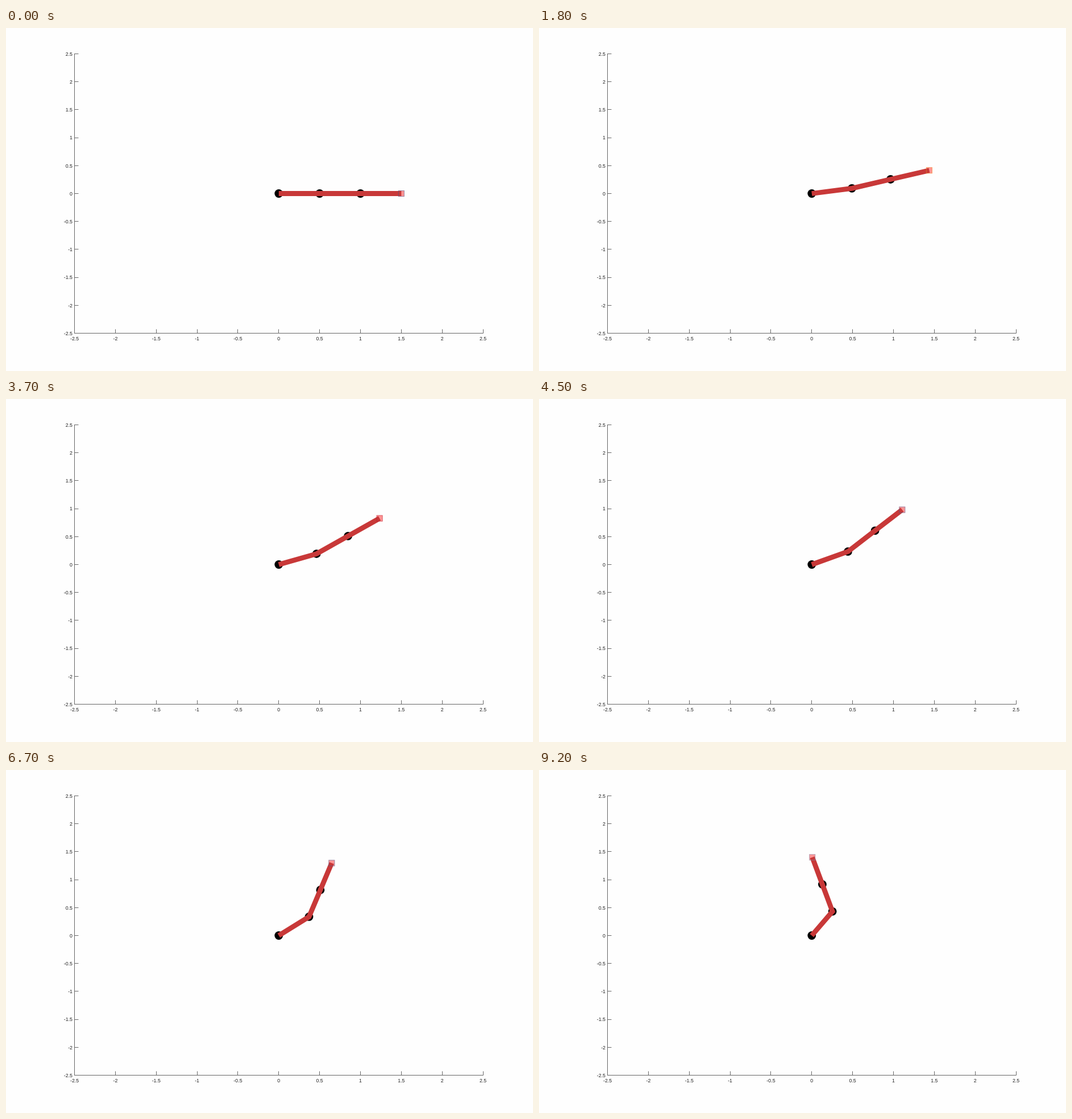
Animation, 927 px wide and 604 px high, one loop 9300 ms. Source, as an HTML page with a canvas:

```html
<!DOCTYPE html>
<html>
<head>
<meta charset="utf-8">
<style>
html, body { margin: 0; width: 100%; height: 100%; overflow: hidden; background: #fefefe; }
canvas { display: block; }
</style>
</head>
<body>
<canvas id="stage" width="927" height="604"></canvas>
<script>
const ctx = document.getElementById('stage').getContext('2d');
const LOOP = 9300, STEP = 100, HOLD = 6;
const EDGES = ['#0072bd', '#d95319', '#edb120', '#7e2f8e', '#77ac30', '#4dbeee', '#a2142f'];

const px = x => 479.8 + 143.7 * x;
const py = y => 291.5 - 98.4 * y;

function line(x1, y1, x2, y2) {
  ctx.beginPath();
  ctx.moveTo(x1, y1);
  ctx.lineTo(x2, y2);
  ctx.stroke();
}

function drawAxes() {
  ctx.strokeStyle = '#666';
  ctx.lineWidth = 1;
  ctx.fillStyle = '#222';
  ctx.font = '8.8px "Liberation Sans", Helvetica, Arial, sans-serif';
  line(120.5, 45, 120.5, 538);
  line(120, 537.5, 839.5, 537.5);
  for (let i = -5; i <= 5; i++) {
    const v = i / 2;
    const x = Math.floor(px(v)) + 0.5, y = Math.floor(py(v)) + 0.5;
    line(x, 530.5, x, 537.5);
    line(120.5, y, 127.5, y);
    ctx.textAlign = 'center';
    ctx.fillText(v, px(v), 549.8);
    ctx.textAlign = 'right';
    ctx.fillText(v, 117, py(v) + 3.2);
  }
}

// Swing progress in degrees of the arm's tip, slightly accelerating
function swing(n) {
  return n < HOLD ? 0 : 0.875 * n + 0.00105 * n * n;
}

function drawArm(phase) {
  const rad = Math.PI / 180;
  const a = phase * 2 / 3 * rad, c = phase * 7 / 6 * rad;
  const joints = [[0, 0]];
  for (const angle of [a, c, c]) {
    const [x, y] = joints[joints.length - 1];
    joints.push([x + 0.5 * Math.cos(angle), y + 0.5 * Math.sin(angle)]);
  }
  const pts = joints.map(([x, y]) => [px(x), py(y)]);
  const [tx, ty] = pts[3];

  ctx.fillStyle = '#ff9494';
  ctx.fillRect(tx - 5.5, ty - 5.5, 11, 11);

  ctx.fillStyle = '#000';
  for (const [x, y] of pts.slice(0, 3)) {
    ctx.beginPath();
    ctx.arc(x, y, 7.4, 0, 2 * Math.PI);
    ctx.fill();
  }

  ctx.strokeStyle = '#c83838';
  ctx.lineWidth = 8.8;
  ctx.lineJoin = 'miter';
  ctx.beginPath();
  pts.forEach(([x, y]) => ctx.lineTo(x, y));
  ctx.stroke();

  ctx.globalAlpha = 0.4;
  ctx.strokeStyle = EDGES[Math.round(phase) % EDGES.length];
  ctx.lineWidth = 1;
  ctx.strokeRect(tx - 5, ty - 5, 10, 10);
  ctx.globalAlpha = 1;
}

const start = performance.now();
function frame() {
  const t = (performance.now() - start) % LOOP;
  ctx.fillStyle = '#fefefe';
  ctx.fillRect(0, 0, 927, 604);
  drawAxes();
  drawArm(swing(Math.floor(t / STEP)));
  requestAnimationFrame(frame);
}
frame();
</script>
</body>
</html>
```
